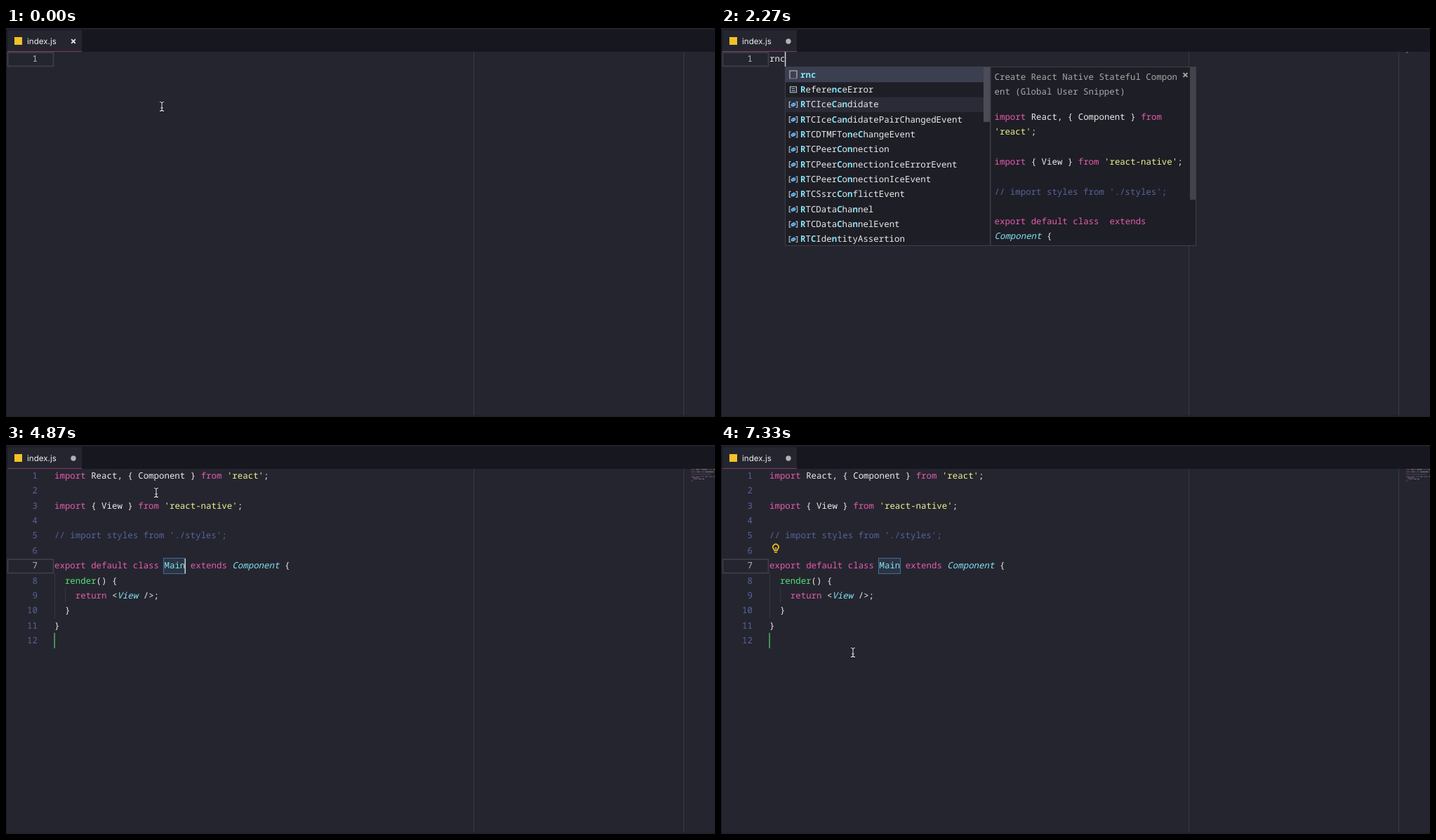
Animation of 1010x555 px, one loop 7390 ms. Source, as an HTML page with a canvas:

```html
<!DOCTYPE html>
<html lang="en">
<head>
<meta charset="utf-8">
<title>Snippet completion</title>
<style>
html, body { margin: 0; width: 100%; height: 100%; overflow: hidden; background: #25252f; }
canvas { display: block; }
</style>
</head>
<body>
<canvas id="stage" width="1010" height="555"></canvas>
<script>
const ctx = document.getElementById('stage').getContext('2d');
ctx.textRendering = 'geometricPrecision';

const LOOP = 7390, LINE = 21.36, CHAR = 7.452, LEFT = 69;
const MONO = '12.42px "Noto Sans Mono", "DejaVu Sans Mono", monospace';
const T = { r: 1000, n: 1330, popup: 1400, c: 1960, accept: 4470, bulb: 5200 };
const C = {
  bg: '#25252f', bar: '#17171f', rule: '#393a44', text: '#ebebec', dim: '#a8a8ac',
  pink: '#e65cad', yellow: '#edf38c', cyan: '#82e3f5', green: '#50e474',
  comment: '#56659a', panel: '#1e1e26', edge: '#3e3f49', select: '#3c3f50', hover: '#2a2b36'
};

const CODE = [
  "import React, { Component } from 'react';", "",
  "import { View } from 'react-native';", "",
  "// import styles from './styles';", "",
  "export default class Main extends Component {",
  "  render() {", "    return <View />;", "  }", "}", ""
];

// Documentation lines: baseline, text
const DOC = [
  [131, "import React, { Component } from"], [152, "'react';"],
  [195, "import { View } from 'react-native';"],
  [238, "// import styles from './styles';"],
  [280, "export default class  extends"], [301, "Component {"]
];

// Icon letter, then label; ^ marks a matched character
const LIST_RN = [
  's ^r^nc', 's ^r^nss', 's ^r^nstory', 'i ^Radio^NodeList', 'i ^Ra^ndomSource',
  'i ^Ra^nge', 'v ^Ra^ngeError', 'k ^reado^nly', 'k ^retur^n', 'i ^Respo^nse',
  'i ^RTCIde^ntityAssertion', 'v ^Refere^nceError'
];
const LIST_RNC = [
  's ^r^n^c', 'v ^Refere^n^ceError', 'i ^RTCIce^Ca^ndidate',
  'i ^RTCIce^Ca^ndidatePairChangedEvent', 'i ^RTCDTMFTo^ne^ChangeEvent',
  'i ^RTCPeer^Co^nnection', 'i ^RTCPeer^Co^nnectionIceErrorEvent',
  'i ^RTCPeer^Co^nnectionIceEvent', 'i ^RTCSsrc^Co^nflictEvent',
  'i ^RTCData^Cha^nnel', 'i ^RTCData^Cha^nnelEvent', 'i ^RT^CIde^ntityAssertion'
];

const MOUSE = [
  [0, 222, 112], [2900, 222, 112], [3500, 217, 71], [4470, 217, 71], [4700, 214, 68],
  [5250, 214, 68], [5750, 234, 264], [6150, 234, 264], [6650, 188, 296]
];

const TOKEN = /(\/\/.*)|('[^']*')|\b(import|from|export|default|class|extends|return)\b|(render)|(Main)|((?<=extends |<)(?:Component|View)|^Component)|[^\s']+?(?=\b|\s|$)/g;
const TOKEN_COLORS = [C.comment, C.yellow, C.pink, C.green, C.cyan, C.cyan];

function tokens(line) {
  return [...line.matchAll(TOKEN)].map(m => {
    const kind = m.slice(1).findIndex(Boolean);
    return { at: m.index, text: m[0], color: TOKEN_COLORS[kind] || C.text, italic: kind === 5 };
  });
}

function rect(x, y, w, h, color) {
  ctx.fillStyle = color;
  ctx.fillRect(x, y, w, h);
}

function frame(x, y, w, h, color, width = 1) {
  ctx.strokeStyle = color;
  ctx.lineWidth = width;
  ctx.strokeRect(x, y, w, h);
}

function path(d, color, width = 1) {
  ctx.strokeStyle = color;
  ctx.lineWidth = width;
  ctx.stroke(new Path2D(d));
}

function text(str, x, y, color, style = '') {
  ctx.font = style + ' ' + MONO;
  ctx.fillStyle = color;
  ctx.fillText(str, x, y);
}

function codeLine(line, x, y) {
  for (const k of tokens(line)) {
    text(k.text, x + k.at * CHAR, y, k.color, k.italic ? 'italic' : '');
  }
}

function cross(x, y, r, color) {
  path(`M${x - r} ${y - r}L${x + r} ${y + r}M${x + r} ${y - r}L${x - r} ${y + r}`, color, 1.9);
}

function drawShell(dirty) {
  rect(0, 0, 1010, 555, C.bg);
  rect(0, 0, 1010, 34, C.bar);
  rect(0, 0, 1010, 2, '#22232c');
  rect(2, 3, 106, 31, C.bg);
  rect(2, 33, 106, 1, '#7c3c64');
  rect(0, 2, 1, 553, '#1b1b23');
  rect(0, 553, 1010, 2, '#20212a');
  rect(666, 34, 1, 519, C.rule);
  rect(965, 34, 1, 519, C.rule);

  rect(12, 13, 11, 11, '#f3c12b');
  ctx.font = '11.6px Inter, "Open Sans", sans-serif';
  ctx.fillStyle = '#ededee';
  ctx.fillText('index.js', 30, 23);
  if (dirty) {
    ctx.fillStyle = '#b1b1b5';
    ctx.beginPath();
    ctx.arc(96, 19, 3.7, 0, 7);
    ctx.fill();
  } else {
    cross(96, 19, 2.8, '#e8e8ea');
  }
}

function drawMinimap(lines) {
  ctx.globalAlpha = 0.5;
  lines.forEach((line, i) => {
    for (const k of tokens(line)) {
      rect(976 + k.at * 0.95, 34.4 + i * 1.7, k.text.length * 0.85, 1, k.color);
    }
  });
  ctx.globalAlpha = 1;
}

function drawCode(lines, active) {
  frame(2.5, 35 + active * LINE, 65, 19.5, '#3f404a', 1.6);
  lines.forEach((line, i) => {
    const y = 48 + i * LINE;
    ctx.textAlign = 'right';
    text(i + 1, 45, y, i === active ? '#b4b4b8' : C.comment);
    ctx.textAlign = 'left';
    codeLine(line, LEFT, y);
  });
}

function drawCaret(x, line) {
  rect(x, 34 + line * LINE, 1.5, 21, '#d2d2d4');
}

function drawSnippetMarks() {
  rect(69, 183, 1, 64, '#363741');
  rect(84, 204, 1, 21, '#363741');
  rect(224, 161, 32, 23, '#2b3441');
  frame(224.5, 161.5, 31, 22, '#456a9f');
  rect(68.5, 268, 1.2, 22, '#4fd778');
}

function drawIcon(kind, x, y) {
  const grey = '#c3c3c6';
  if (kind === 's') {
    path(`M${x + 1.5} ${y + 5}V${y - 5.5}H${x + 11.5}V${y + 5}`, grey, 1.1);
    ctx.setLineDash([1.5, 1.3]);
    path(`M${x + 1} ${y + 5.5}H${x + 12}`, grey, 1.2);
    ctx.setLineDash([]);
  } else if (kind === 'i') {
    path(`M${x + 3} ${y - 4}H${x + .8}V${y + 4}H${x + 3}M${x + 10} ${y - 4}H${x + 12.2}V${y + 4}H${x + 10}`, grey, 1.1);
    ctx.fillStyle = '#67b5ee';
    ctx.fill(new Path2D(`M${x + 3} ${y - .5}L${x + 7} ${y - 3}L${x + 10} ${y - 2}V${y + 1}L${x + 6} ${y + 3.3}L${x + 3} ${y + 2}Z`));
    path(`M${x + 3} ${y - .5}L${x + 6} ${y + .6}L${x + 10} ${y - 2}`, '#2d72ad', .8);
  } else if (kind === 'v') {
    frame(x + 2, y - 4, 9, 8, grey, 1.1);
    path(`M${x + 4} ${y - 1.3}H${x + 9}M${x + 4} ${y + 1.5}H${x + 9}`, '#74b9e8', 1.1);
  } else {
    path(`M${x + .5} ${y - 1}H${x + 8}M${x + .5} ${y + 2}H${x + 5}M${x + 7} ${y + 2}H${x + 12}M${x + .5} ${y + 5}H${x + 7}M${x + 9} ${y + 5}H${x + 12}M${x + 8} ${y - 4}H${x + 12}`, grey, 1.1);
    frame(x + 1, y - 5, 5, 2, grey);
  }
}

function drawLabel(label, x, y) {
  const parts = label.match(/\^.|[^^]+/g);
  for (const part of parts) {
    const hit = part[0] === '^';
    const str = hit ? part[1] : part;
    text(str, x, y, hit ? C.cyan : C.text, hit ? 'bold' : '');
    x += str.length * CHAR;
  }
}

function drawPopup(x, list, mouseY, thumb, docBar) {
  rect(x, 55, 586, 256, C.panel);
  const hover = Math.floor((mouseY - 56) / LINE);
  if (hover > 0) rect(x, 56 + hover * LINE, 292, LINE, C.hover);
  rect(x, 56, 292, LINE, C.select);
  list.forEach((item, i) => {
    const y = 66.5 + i * LINE;
    drawIcon(item[0], x + 5.5, y);
    drawLabel(item.slice(2), x + 22, y + 4);
  });
  rect(x + 283, 56, 9, thumb, '#4b4c55');

  const docX = x + 298.5;
  text('Create React Native Stateful Compon', docX, 74, C.dim);
  text('ent (Global User Snippet)', docX, 95, C.dim);
  for (const [y, line] of DOC) codeLine(line, docX, y);
  cross(x + 570.5, 67, 2.9, '#a9a9ad');
  if (docBar > 0) {
    ctx.globalAlpha = docBar;
    rect(x + 577, 56, 9, 189, '#42434b');
    ctx.globalAlpha = 1;
  }
  frame(x + .5, 55.5, 585, 255, C.edge);
  rect(x + 292, 56, 1.5, 255, C.edge);
}

function drawBeam(x, y) {
  const d = `M${x - 3} ${y - 6.5}Q${x} ${y - 6.5} ${x} ${y - 4.5}Q${x} ${y - 6.5} ${x + 3} ${y - 6.5}` +
    `M${x} ${y - 5}V${y + 5}M${x - 3} ${y + 6.5}Q${x} ${y + 6.5} ${x} ${y + 4.5}` +
    `Q${x} ${y + 6.5} ${x + 3} ${y + 6.5}M${x - 1.8} ${y + 2}H${x + 1.8}`;
  path(d, '#111118', 2.6);
  path(d, '#e9e9ec', 1.1);
}

function drawHand(x, y) {
  ctx.save();
  ctx.translate(x, y);
  const hand = new Path2D('M-3.5 -1Q-2 -3-.8 -1L1 3L1.4 2Q3 1 3.5 2.5Q5 1.5 5.4 3Q7 2.5 7 4.5V8L5.5 10.5V12H-1V10.5L-4.5 6.5Q-5.5 4.5-3.5 5L-2 6Z');
  ctx.fillStyle = '#f4f4f4';
  ctx.fill(hand);
  ctx.strokeStyle = '#15151b';
  ctx.lineWidth = 0.9;
  ctx.stroke(hand);
  path('M1.2 8V10.5M3.2 8V10.5M5 8V10', '#33333a', .7);
  ctx.restore();
}

function drawBulb() {
  path('M76 150.5Q76 149.5 74.8 148A4 4 0 1 1 81.2 148Q80 149.5 80 150.5Z', '#efbd24', 1.7);
  path('M76 153H80M78 150V147M76.7 146.3L78 147.3L79.3 146.3', '#efbd24', 1.3);
}

function mouseAt(t) {
  let i = 0;
  while (i < MOUSE.length - 1 && MOUSE[i + 1][0] <= t) i++;
  const a = MOUSE[i], b = MOUSE[i + 1] || a;
  const p = a === b ? 0 : (t - a[0]) / (b[0] - a[0]);
  const e = p * p * (3 - 2 * p);
  return [a[1] + (b[1] - a[1]) * e, a[2] + (b[2] - a[2]) * e];
}

function caretOn(t) {
  if (t < T.r) return t >= 400 && t < 870;
  const last = [T.accept, T.c, T.n, T.r].find(k => t >= k);
  return (t - last) % 1000 < 500;
}

function draw(t) {
  const accepted = t >= T.accept;
  const typed = [T.r, T.n, T.c].filter(k => t >= k).length;
  const lines = accepted ? CODE : ['rnc'.slice(0, typed)];
  const [mx, my] = mouseAt(t);

  drawShell(typed > 0);
  drawMinimap(lines);
  if (accepted) drawSnippetMarks();
  drawCode(lines, accepted ? 6 : 0);
  if (caretOn(t)) {
    if (accepted) drawCaret(254.5, 6);
    else drawCaret(LEFT - .5 + typed * CHAR, 0);
  }
  if (t >= T.bulb) drawBulb();

  const popup = t >= T.popup && !accepted;
  if (popup) {
    if (typed < 3) drawPopup(84, LIST_RN, my, 46, 0);
    else drawPopup(91, LIST_RNC, my, 78, Math.min(1, 1 - (t - T.c - 500) / 800));
  }
  if (t < T.r || t >= 2900) {
    if (popup) drawHand(mx, my);
    else drawBeam(mx, my);
  }
}

const start = performance.now();
function tick(now) {
  draw(Math.max(0, now - start) % LOOP);
  requestAnimationFrame(tick);
}
draw(0);
requestAnimationFrame(tick);
</script>
</body>
</html>
```
